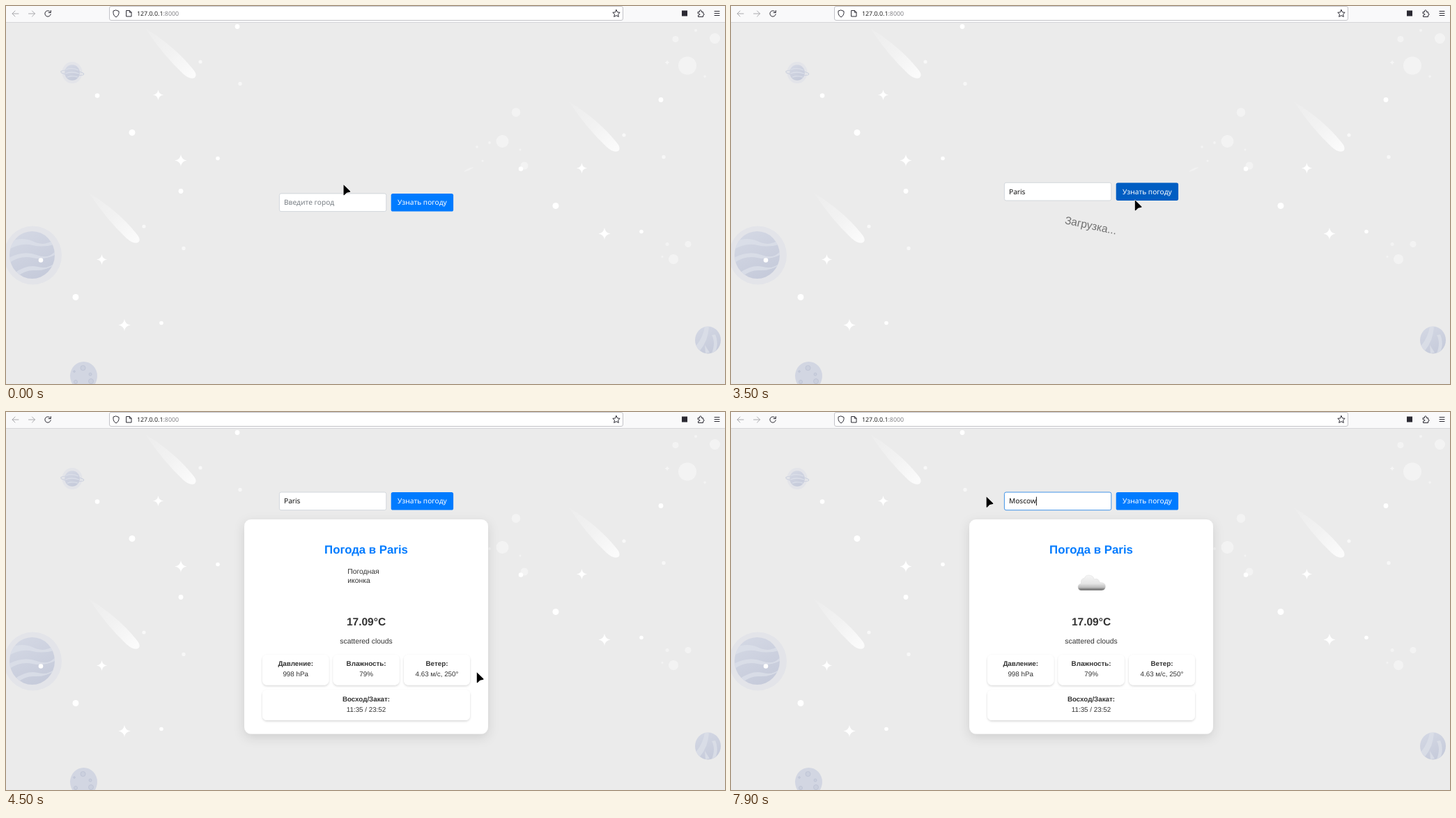
Animation of 1032 by 542 pixels, one loop 8000 ms. Source, as an HTML page:

```html
<!DOCTYPE html>
<html lang="ru">
<head>
<meta charset="utf-8">
<title>Погода</title>
<style>
  html, body { margin: 0; width: 100%; height: 100%; overflow: hidden; background: #ebebeb; }
  svg { display: block; width: 100%; height: 100%; }
  text { text-rendering: geometricPrecision; white-space: pre; }
  .ui { font-family: "Noto Sans", "Open Sans", sans-serif; font-size: 10.15px; }
  .card { font-family: "Liberation Sans", Arial, sans-serif; font-size: 9.8px; fill: #333; text-anchor: middle; }
  .bold { font-weight: bold; }
  .line { fill: none; stroke: #2b2a33; stroke-width: 1; stroke-linecap: round; stroke-linejoin: round; }
  .off { stroke: #a9a9ad; }
</style>
</head>
<body>
<svg viewBox="0 0 1032 542" preserveAspectRatio="none">
  <defs>
    <linearGradient id="tail" gradientUnits="userSpaceOnUse" x1="202" y1="35" x2="268" y2="100">
      <stop offset="0" stop-color="#fff" stop-opacity=".1"/>
      <stop offset=".5" stop-color="#fff" stop-opacity=".35"/>
      <stop offset="1" stop-color="#fff" stop-opacity=".82"/>
    </linearGradient>
    <linearGradient id="rock" x1=".2" y1="0" x2=".7" y2="1">
      <stop offset="0" stop-color="#d4d8e4"/>
      <stop offset="1" stop-color="#c5cada"/>
    </linearGradient>
    <linearGradient id="cloud" x1="0" y1="0" x2="0" y2="1">
      <stop offset="0" stop-color="#f6f6f6"/>
      <stop offset=".55" stop-color="#e6e6e6"/>
      <stop offset=".8" stop-color="#bdbdbd"/>
      <stop offset="1" stop-color="#555"/>
    </linearGradient>
    <filter id="soft" x="-20%" y="-20%" width="140%" height="140%">
      <feDropShadow dx="0" dy="5" stdDeviation="8" flood-color="#000" flood-opacity=".12"/>
    </filter>
    <filter id="lift" x="-10%" y="-20%" width="120%" height="150%">
      <feDropShadow dx="0" dy="1.5" stdDeviation="1.7" flood-color="#000" flood-opacity=".16"/>
    </filter>
    <clipPath id="bigClip"><ellipse cx="37.5" cy="357" rx="32.5" ry="34"/></clipPath>
    <clipPath id="sideClip"><ellipse cx="1007.5" cy="479" rx="18.5" ry="19.5"/></clipPath>
    <path id="spark" d="M0-8Q.9-.9 8 0Q.9.9 0 8Q-.9.9-8 0Q-.9-.9 0-8Z" fill="#fff"/>
    <g id="sky" fill="#fff">
      <path d="M200 32Q242 58 267 89Q276 99 270.500 103Q264 106 254 97Q226 71 200 32Z" fill="url(#tail)"/>
      <circle cx="279" cy="80" r="2.6" opacity=".65"/>
      <circle cx="336" cy="111.500" r="2.700" opacity=".6"/>
      <circle cx="332" cy="29.500" r="3.400"/>
      <circle cx="131" cy="128.500" r="3.300"/>
      <circle cx="181" cy="181.500" r="4.500"/>
      <circle cx="304" cy="218.500" r="2.800"/>
      <use href="#spark" transform="translate(218.500 127.500) scale(.95)"/>
      <use href="#spark" transform="translate(251 221.500) scale(1.08)"/>
    </g>
  </defs>

  <rect width="1032" height="542" fill="#ebebeb"/>

  <!-- planets -->
  <ellipse cx="38.500" cy="357.500" rx="41.500" ry="42" fill="#e3e4e9"/>
  <g clip-path="url(#bigClip)">
    <rect x="4" y="322" width="68" height="70" fill="url(#rock)"/>
    <g fill="#dde1ea" opacity=".75">
      <path d="M4 338Q24 330 40 338T72 333V341Q54 347 38 343T4 349Z"/>
      <path d="M4 361Q26 350 44 357T72 350V356Q56 365 38 361T4 369Z"/>
      <path d="M12 383Q30 370 46 374T72 366V370Q56 380 42 379T16 388Z"/>
    </g>
  </g>
  <ellipse cx="95" cy="95.500" rx="14.500" ry="15.500" fill="#e3e4e9"/>
  <ellipse cx="95" cy="95.500" rx="10.800" ry="11.300" fill="url(#rock)"/>
  <path d="M86 91Q95 88 104 92M85 97Q94 93 105 97M88 102Q95 99 103 102" fill="none" stroke="#dbdfe9" stroke-width="1.300"/>
  <path d="M85 92Q76 93 80 96Q94 102 110 99Q115 97 105 94" fill="none" stroke="#cdd2df" stroke-width="1.200"/>
  <ellipse cx="111.500" cy="530.500" rx="19.500" ry="20.500" fill="#d2d6e2"/>
  <g fill="#cbd0de" stroke="#bcc2d3" stroke-width=".8">
    <circle cx="110.500" cy="519" r="3.500"/><circle cx="121" cy="528" r="2"/>
    <circle cx="100" cy="539" r="2.500"/><circle cx="122" cy="538" r="3.500"/><circle cx="98" cy="524" r="1.300"/>
  </g>
  <g clip-path="url(#sideClip)">
    <rect x="988" y="459" width="39" height="40" fill="url(#rock)"/>
    <path d="M1003 460Q1001 474 990 488L996 494Q1008 480 1009 459ZM1013 472Q1019 482 1013 498L1019 494Q1023 482 1018 471ZM1003 486L1010 497L1004 498Z" fill="#dce0e9" opacity=".8"/>
  </g>

  <use href="#sky"/>
  <use href="#sky" x="-81" y="236"/>
  <use href="#sky" x="608" y="105"/>
  <g id="bubbles" fill="#fff" opacity=".42"></g>
  <use href="#spark" transform="translate(949 81) scale(.5)" opacity=".5"/>
  <path d="M657 238Q661 232 671 231Q667 236 657 238Z" fill="#fff" opacity=".3"/>

  <!-- browser bar -->
  <rect width="1032" height="23.500" fill="#f9f9fa"/>
  <rect y="23" width="1032" height="1" fill="#d6d6d9"/>
  <rect x="148.500" y=".5" width="737" height="20" rx="2.500" fill="#fff" stroke="#c3c3c8"/>
  <path class="line off" d="M18 11H9M13 7L9 11L13 15M32.500 11H41.500M37.500 7L41.500 11L37.500 15"/>
  <path class="line" stroke-width="1.200" d="M63.500 8.500A4.200 4.200 0 1 0 64.200 11.800M64.300 6.500V9.500H61.200"/>
  <path class="line" d="M158 6L162 7.500V10.500Q161.700 14 158 16Q154.300 14 154 10.500V7.500Z"/>
  <path class="line" d="M173 6.500H177.500L180 9V15H173ZM177.300 6.700V9.200H179.800"/>
  <path class="line" d="M876 5.500L877.600 8.900L881.200 9.300L878.500 11.800L879.300 15.400L876 13.600L872.700 15.400L873.500 11.800L870.800 9.300L874.400 8.900Z"/>
  <rect x="970" y="6.500" width="8" height="8" fill="#2b2a33"/>
  <path class="line" d="M993.500 8.500H995.500Q995 5.800 996.800 5.800T998.200 8.500H1000.500V10.800Q1002 10.600 1002 12T1000.500 13.300V15.500H993.500V13.300Q996 13.300 996 12T993.500 10.800Z"/>
  <path class="line" d="M1017 7.500H1024M1017 10.500H1024M1017 13.500H1024"/>
  <text class="ui" x="188" y="14.300" style="font-size:8.85px" fill="#222">127.0.0.1<tspan fill="#858589">:8000</tspan></text>

  <!-- result card -->
  <g id="card" class="card">
    <rect x="342" y="154" width="350" height="307.500" rx="9.700" fill="#fff" filter="url(#soft)"/>
    <text class="bold" x="517" y="203" font-size="16.8" style="font-size:16.8px" fill="#007bff">Погода в Paris</text>
    <g id="alt" style="font-size:10.35px;text-anchor:start">
      <text x="490.300" y="232">Погодная</text>
      <text x="490.300" y="244.500">иконка</text>
    </g>
    <path id="icon" d="M502 255.800Q498 255 498 251Q498 247 502.500 246Q501.500 239 507 238.500Q509 233.500 514 234Q520 234.500 521.500 240Q527 237.500 529.500 244.500Q537.500 244 537.500 250.500Q537 255.800 532 255.800Z" fill="url(#cloud)" stroke="#d4d4d4" stroke-width=".4"/>
    <text class="bold" x="517" y="305.500" style="font-size:15.5px">17.09°C</text>
    <text x="517" y="332" style="font-size:10.35px">scattered clouds</text>
    <g id="facts"></g>
  </g>

  <!-- form -->
  <g id="form" class="ui">
    <rect id="field" x="392.400" y="268.900" width="153.400" height="25.700" rx="2.500" fill="#fff" stroke-width=".9"/>
    <rect id="pick" x="399" y="275" height="13.500" fill="#3584e4"/>
    <text id="typed" x="399" y="285.300"></text>
    <rect id="caret" y="275.500" width=".9" height="12.500" fill="#000"/>
    <rect id="button" x="552.700" y="269" width="89.400" height="25.500" rx="2.600"/>
    <text x="597.400" y="285.300" text-anchor="middle" fill="#fff">Узнать погоду</text>
  </g>

  <text id="loading" class="card" x="516.500" y="319.900" style="font-size:15.5px;fill:#707070">Загрузка...</text>

  <g id="pointer">
    <path id="arrow" d="M0 0V14.600Q.2 15.600 1.200 14.800L4.600 11.500L9.200 10.500Q10.300 10 9.500 9.200Z" fill="#000" stroke="#fff" stroke-width="1" paint-order="stroke" stroke-linejoin="round"/>
    <g id="beam" fill="none">
      <path d="M-2.800-6H2.800M0-6V6M-2.800 6H2.800" stroke="#fff" stroke-width="2.600" opacity=".8"/>
      <path d="M-2.800-6Q-.5-6 0-5Q.5-6 2.800-6M0-5.500V5.500M-2.800 6Q-.5 6 0 5Q.5 6 2.800 6" stroke="#000" stroke-width="1.300"/>
    </g>
  </g>
</svg>
<script>
const LOOP = 8000, STEP = 100;
const $ = id => document.getElementById(id);
const show = (id, on) => { $(id).style.display = on ? "" : "none"; };
const set = (id, attrs) => { for (const k in attrs) $(id).setAttribute(k, attrs[k]); };

function add(parent, tag, attrs, text) {
  const el = document.createElementNS("http://www.w3.org/2000/svg", tag);
  for (const k in attrs) el.setAttribute(k, attrs[k]);
  if (text) el.textContent = text;
  $(parent).append(el);
}

// faint bubbles: x, y, radius
[[978, 85.5, 13], [1017.5, 46.5, 7.5], [961, 47.5, 4.5], [990, 35, 2], [1003, 101, 1.8],
 [712.5, 194, 9], [732, 152.5, 6.3], [744, 229, 5.5], [694, 196, 2], [676, 202, 1.7],
 [684, 222, 1.5], [738, 206, 1.5], [958, 363, 7], [979, 341.5, 4.5], [949, 341.5, 2.5], [942, 359.5, 1.5]
].forEach(([cx, cy, r]) => add("bubbles", "circle", { cx, cy, r }));

[[368, 348, 95.3, "Давление:", "998 hPa"],
 [469.6, 348, 95, "Влажность:", "79%"],
 [571, 348, 95, "Ветер:", "4.63 м/с, 250°"],
 [368, 398.5, 298, "Восход/Закат:", "11:35 / 23:52"]
].forEach(([x, y, width, label, value]) => {
  const mid = x + width / 2;
  add("facts", "rect", { x, y, width, height: 43.5, rx: 6.5, fill: "#fff", filter: "url(#lift)" });
  add("facts", "text", { x: mid, y: y + 16, class: "bold" }, label);
  add("facts", "text", { x: mid, y: y + 31 }, value);
});

// each row holds from its time until the next one
const pointer = [
  [0, 484.5, 256.2, "arrow"], [200, 481, 262, "arrow"], [300, 475, 277, "beam"], [400, 473.7, 280, "beam"],
  [2800, 490, 281, "beam"], [2900, 535, 281, "beam"], [3000, 570, 279, "arrow"], [3100, 579.8, 278.2, "arrow"],
  [4300, 630, 325, "arrow"], [4400, 673.3, 367.7, "arrow"], [4500, 675.8, 373.2, "arrow"],
  [5100, 640, 325, "arrow"], [5200, 555, 236, "arrow"], [5300, 519.8, 209, "arrow"],
  [5600, 505, 188, "arrow"], [5700, 474, 150, "arrow"], [5800, 454, 128, "beam"], [5900, 450.2, 124.3, "beam"],
  [6200, 440, 124, "beam"], [6300, 398, 123, "beam"], [6400, 367, 122, "beam"], [7100, 366.6, 121.6, "arrow"]
];
const typed = [
  [0, ""], [1200, "P"], [1700, "Pa"], [1900, "Par"], [2000, "Pari"], [2100, "Paris"],
  [7100, "M"], [7200, "Mo"], [7300, "Mos"], [7400, "Mosc"], [7800, "Mosco"], [7900, "Moscow"]
];
const border = [
  [0, "#ced4da"], [700, "#a3bddb"], [800, "#5b9fe4"], [900, "#2e8ae6"], [3400, "#ced4da"],
  [6200, "#a3bddb"], [6300, "#5b9fe4"], [6400, "#2e8ae6"]
];
const button = [[0, "#007bff"], [3000, "#006fe4"], [3100, "#005dc2"], [4300, "#006cde"], [4400, "#007bff"]];
const shift = [[0, 0], [3400, -15.6], [4500, -153.9]];
const caret = [[0, false], [700, true], [2800, false], [6200, true], [6300, false], [7100, true]];

const at = (rows, t) => rows.findLast(row => row[0] <= t).slice(1);

function draw(t) {
  const [x, y, shape] = at(pointer, t);
  set("pointer", { transform: `translate(${x} ${y})` });
  show("arrow", shape === "arrow");
  show("beam", shape === "beam");

  const [word] = at(typed, t);
  const picked = t >= 6300 && t < 7100;
  $("typed").textContent = word || "Введите город";
  set("typed", { fill: picked ? "#fff" : word ? "#111" : "#777d83" });
  const width = word ? $("typed").getComputedTextLength() : 0;
  set("caret", { x: 399 + width });
  set("pick", { width });
  show("caret", at(caret, t)[0]);
  show("pick", picked);

  set("field", { stroke: at(border, t)[0] });
  set("button", { fill: at(button, t)[0] });
  set("form", { transform: `translate(0 ${at(shift, t)[0]})` });

  show("loading", t >= 3400 && t < 4500);
  const angle = Math.max(0, 12 + (t - 3500) * 340 / 900);
  set("loading", { transform: `rotate(${angle} 516.5 314.5)` });

  show("card", t >= 4500);
  show("alt", t < 4800);
  show("icon", t >= 4800);
}

const start = performance.now();
function tick() {
  const t = (performance.now() - start) % LOOP;
  draw(Math.floor(t / STEP) * STEP);
  requestAnimationFrame(tick);
}
tick();
</script>
</body>
</html>
```
